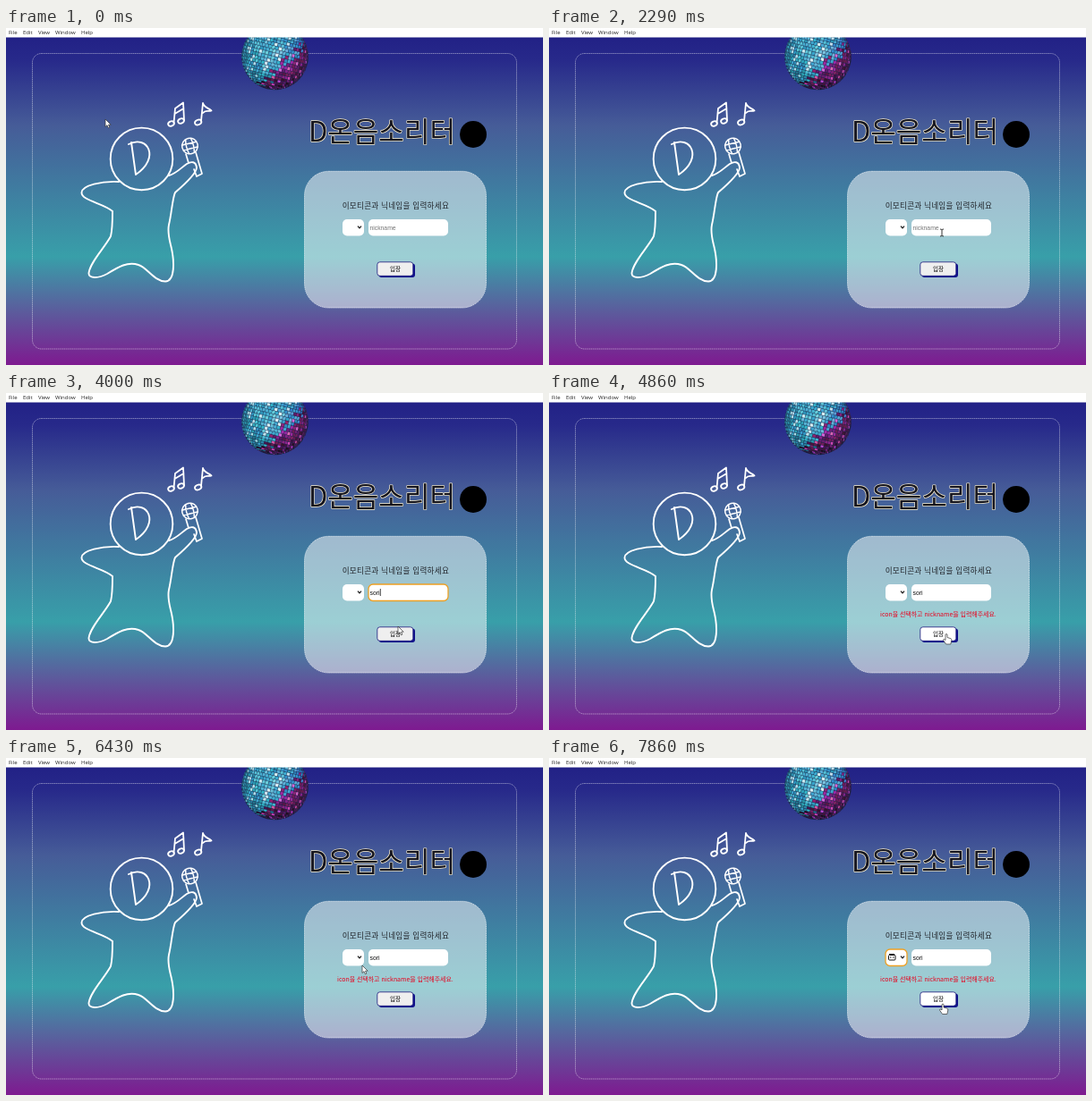
Recreate the animation shown at these times as an HTML page. Size 600 by 377 pixels, loop 8 s.

```html
<!DOCTYPE html>
<html lang="ko">
<head>
<meta charset="utf-8">
<style>
  html, body { margin: 0; width: 100%; height: 100%; overflow: hidden; }
  svg { display: block; width: 100%; height: 100%; }
  text { font-family: "Noto Sans CJK KR", "Noto Sans CJK JP", "Noto Sans CJK", sans-serif; white-space: pre; }
  .menu text { font: 6px "Open Sans", sans-serif; fill: #222; }
  .title { font-size: 31px; font-weight: 300; fill: #15151f; stroke: #fff3cf; stroke-width: 1.3px; stroke-linejoin: round; paint-order: stroke; }
  .heading { font-size: 8.6px; letter-spacing: .24px; fill: #22262c; }
  .field { font: 6.8px "Liberation Sans", Arial, sans-serif; }
  .error { font-size: 6.93px; fill: #e8001c; }
  .doodle { fill: none; stroke: #fff; stroke-width: 1.9; stroke-linecap: round; stroke-linejoin: round; }
  .ring { fill: none; stroke: #eda024; stroke-width: 1.3; }
  .cursor > * { fill: #fff; stroke: #333; stroke-width: .7; stroke-linejoin: round; }
</style>
</head>
<body>
<svg viewBox="0 0 600 377" preserveAspectRatio="none">
  <defs>
    <linearGradient id="sky" x2="0" y2="1">
      <stop stop-color="#222186"/>
      <stop offset=".07" stop-color="#27298a"/>
      <stop offset=".27" stop-color="#465c98"/>
      <stop offset=".67" stop-color="#389fa9"/>
      <stop offset="1" stop-color="#7e1a90"/>
    </linearGradient>
    <g id="tape" fill="none">
      <rect x="379.5" y="220.5" width="7.5" height="5.5" rx="1"/>
      <path d="M381 223h1.5M384 223h1.5M380 219.5h6"/>
    </g>
  </defs>
  <rect y="10" width="600" height="367" fill="url(#sky)"/>
  <rect x="29.5" y="28.5" width="541" height="330.5" rx="10" fill="none" stroke="#fff" stroke-opacity=".55" stroke-width=".8" stroke-dasharray="1.2 .6"/>

  <g id="ball" transform="translate(300.5 32) rotate(14)"><circle r="37.3" fill="#1a2648"/></g>

  <g class="menu">
    <rect width="600" height="10.5" fill="#fff"/>
    <text x="3" y="7">File</text><text x="19" y="7">Edit</text><text x="36" y="7">View</text>
    <text x="55" y="7">Window</text><text x="84" y="7">Help</text>
  </g>

  <g class="doodle">
    <circle cx="151.500" cy="146.400" r="34.800"/>
    <path d="M140 128L145 164M137 130C158 119 173 145 145 164"/>
    <path d="M126 172C107 171 85 176 84.500 184C84 193 109 196 119 205C119 215 119 225 117 233C110 246 94 262 92.500 274C92 281 104 280 113 275C126 267 136 261 148 265C158 268 165 283 178 283.500C189 283 188 261 185 247C183 238 180 230 182 220C185 208 186 190 189 184C196 178 213 163 213 156C212 149 207 149 202 152C196 156 190 163 182 165"/>
    <path d="M201 141L204 151M212 139L219 163L213 166L210 158" stroke-width="1.700"/>
    <g transform="translate(205.500 132) rotate(-14)" stroke-width="1.500">
      <circle r="8.800"/><path d="M-8-3H8M-8 3H8M-3-8Q-5 0-3 8M3-8Q5 0 3 8"/>
    </g>
    <g stroke-width="1.800">
      <path d="M187.500 106L189 90L198 83.500L199 103M188.500 96L198.500 90M218 104L220 84C221 89 226 89 229.500 92.500C226 94 223 91 220 95"/>
      <ellipse rx="3.500" ry="2.600" transform="translate(184.500 107) rotate(-25)"/>
      <ellipse rx="3.500" ry="2.600" transform="translate(195.500 104) rotate(-25)"/>
      <ellipse rx="3.800" ry="2.700" transform="translate(214.700 105.500) rotate(-25)"/>
    </g>
  </g>

  <text class="title" x="338" y="126.500">D온음소리터</text>
  <circle cx="522" cy="119" r="15"/>

  <rect x="333.500" y="160.300" width="203" height="152.700" rx="27" fill="#fff" fill-opacity=".5" stroke="#fff" stroke-opacity=".8" stroke-width=".9" stroke-dasharray="1.200 .8"/>
  <text class="heading" x="375.700" y="202.400">이모티콘과 닉네임을 입력하세요</text>
  <rect x="376" y="214" width="24" height="18.500" rx="5" fill="#fff"/>
  <path d="M393 221.700l2 2.200 2-2.200" fill="none" stroke="#111" stroke-width="1.200"/>
  <rect x="405" y="214" width="89" height="18.500" rx="5" fill="#fff"/>
  <rect id="selectRing" class="ring" x="376" y="214" width="24" height="18.500" rx="5"/>
  <rect id="inputRing" class="ring" x="405" y="214" width="89" height="18.500" rx="5"/>
  <text id="nick" class="field" x="406.500" y="225.500"></text>
  <path id="caret" d="M418.300 219v8" stroke="#111" stroke-width=".8"/>
  <use id="icon" href="#tape" stroke="#111"/>
  <text id="error" class="error" x="370" y="250.300">icon을 선택하고 nickname을 입력해주세요.</text>
  <rect x="416.500" y="263.500" width="40.500" height="15.500" rx="3" fill="#10108a"/>
  <rect id="button" x="414.800" y="261.800" width="40" height="15.500" rx="3" stroke="#18187c" stroke-width=".8"/>
  <text x="429" y="272" font-size="6.500">입장</text>

  <g id="list">
    <rect x="376" y="234" width="24" height="28" fill="#fff" stroke="#777" stroke-width=".6"/>
    <rect x="376.300" y="248" width="23.400" height="13.700" fill="#1e74d0"/>
    <use href="#tape" y="32" stroke="#fff"/>
  </g>

  <g id="cursor" class="cursor">
    <path id="arrow" d="M0 0V8.500L2 6.700L3.400 9.800L4.800 9.200L3.500 6.200H6.200Z"/>
    <path id="beam" d="M-2-4Q0-4 0-3Q0-4 2-4M0-3V3M-2 4Q0 4 0 3Q0 4 2 4" style="fill:none;stroke-width:1"/>
    <path id="hand" d="M-1 .6Q0-.6 1 .6V4L5 5.200Q6 5.600 5.800 7L4.800 11.500H-.4L-3.400 7.200Q-3.600 5.600-2.200 6L-1 7Z"/>
  </g>
</svg>
<script>
const $ = id => document.getElementById(id);
const show = (id, on) => $(id).setAttribute('visibility', on ? 'visible' : 'hidden');

// Mirror ball: tiles in latitude rows, teal on the upper left, magenta on the lower right
let seed = 11;
const random = () => (seed = seed * 16807 % 2147483647) / 2147483647;
function buildBall(radius, rows) {
  const step = Math.PI / rows;
  let tiles = '';
  for (let i = 0; i < rows; i++) {
    const lat = -Math.PI / 2 + i * step, mid = Math.cos(lat + step / 2);
    const y = Math.sin(lat) * radius, h = Math.sin(lat + step) * radius - y;
    const count = Math.max(3, Math.round(rows * mid)), turn = Math.PI / count;
    for (let j = 0; j < count; j++) {
      const lon = -Math.PI / 2 + j * turn;
      const x = Math.sin(lon) * mid * radius, w = Math.sin(lon + turn) * mid * radius - x;
      const u = x / radius, v = y / radius, glow = random();
      const pink = u * .6 + v * .4 + random() * .25 > .34;
      const hue = pink ? 290 + random() * 35 : 186 + random() * 14 + Math.max(u, 0) * 25;
      const edge = u * u + v * v;
      const light = (pink ? 26 : 48) + glow * 24 - edge * 14 - Math.max(v, 0) * 10 + (glow > .88 ? 20 : 0);
      tiles += `<rect x="${x}" y="${y}" width="${Math.max(w - .4, .2)}" height="${Math.max(h - .4, .2)}" fill="hsl(${hue} 60% ${light}%)"/>`;
    }
  }
  $('ball').innerHTML += tiles;
}
buildBall(37, 30);

// Pointer stops: time, x, y
const stops = [
  [140, 111, 102], [714, 5, 2], [1429, 250, 65], [2000, 439, 229], [3714, 439, 229],
  [4000, 438, 261], [4143, 444, 269.5], [5286, 444, 269.5], [6286, 398, 232],
  [6714, 398, 232], [7000, 388, 254], [7143, 388, 254], [7714, 440, 275]
];
function pointerAt(t) {
  const n = stops.findIndex(s => s[0] > t);
  if (n === 0) return stops[0].slice(1);
  if (n < 0) return stops[stops.length - 1].slice(1);
  const [t0, x0, y0] = stops[n - 1], [t1, x1, y1] = stops[n];
  const k = (t - t0) / (t1 - t0), ease = k * k * (3 - 2 * k);
  return [x0 + (x1 - x0) * ease, y0 + (y1 - y0) * ease];
}
const inside = (x, y, left, top, right, bottom) => x > left && x < right && y > top && y < bottom;

const word = 'sori', keyTimes = [3000, 3286, 3429, 3571];
const FPS = 7, LOOP = 8000;

function draw(now) {
  const t = Math.floor((now % LOOP + 5) * FPS / 1000) * 1000 / FPS;
  const [x, y] = pointerAt(t);
  const overInput = inside(x, y, 405, 214, 494, 233);
  const overButton = inside(x, y, 415, 262, 455, 278);
  const hidden = (t > 710 && t < 1500) || (t > 2990 && t < 3700);
  const typed = word.slice(0, keyTimes.filter(k => t >= k - 1).length);
  const focused = t > 2400 && t < 4280;

  $('cursor').setAttribute('transform', `translate(${x} ${y})`);
  show('arrow', !hidden && !overInput && !overButton);
  show('beam', !hidden && overInput);
  show('hand', !hidden && overButton);
  $('button').setAttribute('fill', overButton ? '#fff' : '#efefef');

  $('nick').textContent = typed || 'nickname';
  $('nick').setAttribute('fill', typed ? '#111' : '#757575');
  show('inputRing', focused);
  show('caret', focused && typed === word);
  show('error', t > 4280);
  show('selectRing', t > 6560);
  show('list', t > 6560 && t < 7140);
  show('icon', t > 7140);
  requestAnimationFrame(() => draw(performance.now()));
}
draw(performance.now());
</script>
</body>
</html>
```
